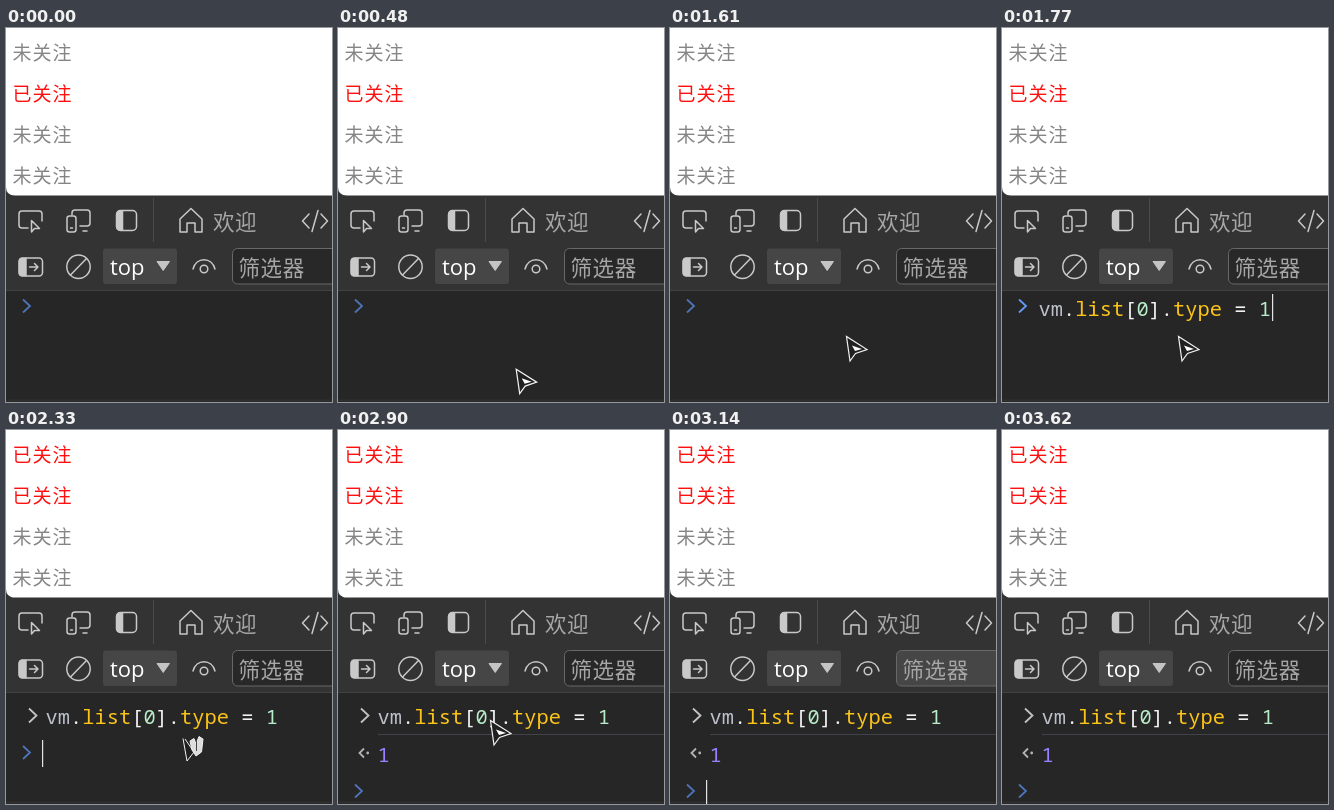
An HTML page that plays this animation: 326 px wide and 374 px high, repeating every 4.35 s.

```html
<!DOCTYPE html>
<html lang="zh">
<head>
<meta charset="utf-8">
<style>
html, body { margin: 0; width: 100%; height: 100%; overflow: hidden; background: #262626; }
svg { display: block; width: 326px; height: 374px; }
text { white-space: pre; }
.cjk { font-family: "Noto Sans CJK SC", "Noto Sans CJK", sans-serif; font-weight: 300; }
.row { font-size: 19px; letter-spacing: 1px; }
.ui { font-size: 21.5px; letter-spacing: .6px; fill: #a6a6a6; }
.code { font: 20.4px "Noto Sans Mono", "DejaVu Sans Mono", monospace; }
.icon { fill: none; stroke: #c9c9c9; stroke-width: 1.5; stroke-linecap: round; stroke-linejoin: round; }
.icon .solid { fill: #c9c9c9; }
.chev { fill: none; stroke-width: 1.8; }
</style>
</head>
<body>
<svg viewBox="0 0 326 374">
  <rect width="326" height="374" fill="#262626"/>
  <rect y="150" width="326" height="112" fill="#333"/>
  <path d="M0 262.5H326" stroke="#424242"/>
  <path d="M0 372.5H326" stroke="#2f2f2f" stroke-width="2"/>
  <path d="M0 0H326V167.5H9Q0 167.5 0 159Z" fill="#fff"/>
  <g id="rows" class="cjk row"></g>

  <path d="M147.5 170V214" stroke="#4b4b4b"/>
  <g class="icon">
    <path d="M22 200H16Q13 200 13 197V186Q13 183 16 183H33Q36 183 36 186V193"/>
    <path d="M25.5 192.500V204L28.500 200.500L33.500 200.500Z"/>
    <path d="M66 187V185Q66 182 69 182H81Q84 182 84 185V195Q84 198 81 198H74M77 203H81"/>
    <rect x="61" y="188" width="9" height="16" rx="2.500"/>
    <path d="M64.500 200H66.500"/>
    <rect x="110.500" y="182.500" width="20" height="20" rx="4"/>
    <path class="solid" d="M116.500 183H114Q111 183 111 186V199Q111 202 114 202H116.500Z"/>
    <path d="M174 191L185 180.500L196 191V204H189V195H181V204H174Z"/>
    <path d="M303 186L296.500 193L303 200M315 186L321.500 193L315 200M312 182.500L306 203.500"/>
    <rect x="13" y="230" width="23.500" height="18" rx="3.500"/>
    <path class="solid" d="M20 230.500H16Q13.500 230.500 13.500 233V245Q13.500 247.500 16 247.500H20Z"/>
    <path d="M23.500 239H32M28.500 235.500L32 239L28.500 242.500"/>
    <circle cx="72.500" cy="238.800" r="11.700"/>
    <path d="M64.500 247L80.500 230.500"/>
    <path d="M187 241C190 228.500 206 228.500 209 241"/>
    <circle cx="198" cy="241" r="3.800"/>
  </g>
  <text class="cjk ui" x="207" y="201.500">欢迎</text>
  <rect x="97" y="220.500" width="74" height="35.500" rx="3" fill="#464646"/>
  <text x="104" y="247" font-family="Open Sans, Noto Sans, sans-serif" font-size="22" fill="#fff">top</text>
  <path d="M151 233.500H163.500L157.200 242.500Z" fill="#c4c4c4" stroke="#c4c4c4" stroke-linejoin="round"/>
  <rect id="filter" x="226.500" y="220.500" width="110" height="35.500" rx="5" stroke="#686868"/>
  <text class="cjk ui" x="232.500" y="248">筛选器</text>

  <path id="rule" d="M40 304.500H326" stroke="#41434b"/>
  <text id="code" class="code"><tspan fill="#bcc0c8">vm</tspan><tspan fill="#f2f2f2">.</tspan><tspan fill="#fcc419">list</tspan><tspan fill="#f2f2f2">[</tspan><tspan fill="#b9ecc8">0</tspan><tspan fill="#f2f2f2">].</tspan><tspan fill="#fcc419">type</tspan><tspan fill="#f2f2f2"> = </tspan><tspan fill="#b9ecc8">1</tspan></text>
  <path id="past" class="chev" d="M23 278.500L30.500 285.500L23 292.500" stroke="#c4c4c4"/>
  <g id="result">
    <path class="chev" d="M26 318.500L21.500 323L26 327.500" stroke="#b4b4b4"/>
    <circle cx="29.700" cy="323" r="1.400" fill="#b4b4b4"/>
    <text class="code" x="39.500" y="332" fill="#9a80ff">1</text>
  </g>
  <path id="prompt" class="chev" d="M-3.500 -6.500L3.500 0L-3.500 6.500"/>
  <rect id="caret" width="1.200" height="27" fill="#e4e4e4"/>
  <g id="cursor">
    <path d="M.5 .5L4 25L9.500 17.500L21 13.500Z" fill="#202020" stroke="#f2f2f2" stroke-width="1.200"/>
    <path d="M6 9.500L16 13L9 15Z" fill="#fff"/>
  </g>
  <g id="blend" stroke="#f2f2f2" fill="#202020">
    <path d="M177 308.500L181 331L188 322L179 309"/>
    <path d="M184 311L188 308.500L190 314L193 306.500L197 309L195.500 322L190 326L186 320Z" fill="#ddd"/>
    <path d="M190.500 311V321" stroke="#444"/>
  </g>
</svg>
<script>
const LOOP = 4350, TICK = 80;
const TYPED = 1770, ENTERED = 2330, REPLIED = 2410;
const el = id => document.getElementById(id);
const attr = (id, values) => {
  for (const key in values) el(id).setAttribute(key, values[key]);
};
const show = (id, on) => attr(id, { visibility: on ? 'visible' : 'hidden' });
const move = (id, x, y) => attr(id, { transform: `translate(${x} ${y})` });
const within = (t, a, b) => t >= a && t < b;

const rows = [0, 1, 2, 3].map(i => {
  const row = document.createElementNS('http://www.w3.org/2000/svg', 'text');
  row.setAttribute('x', 6.5);
  row.setAttribute('y', 31.5 + i * 41);
  el('rows').append(row);
  return row;
});

// The pointer was sampled every 80 ms, so it moves in steps.
function pointer(t) {
  if (t < 2900) {
    const k = Math.min(1, Math.floor((t - 400) / TICK) / 4);
    const left = (1 - k) ** 2;
    return [176 + 3 * left, 308 + 58 * left];
  }
  const k = Math.floor((t - 2900) / TICK);
  return [152 + 52 * k, 290 - 25 * k];
}

function caretOn(t) {
  return within(t, 960, 1610) || within(t, TYPED, 2900) || within(t, 3140, 3620);
}

function draw(t) {
  const typed = t >= TYPED, entered = t >= ENTERED, replied = t >= REPLIED;

  rows.forEach((row, i) => {
    const on = i === 1 || (i === 0 && entered);
    row.textContent = on ? '已关注' : '未关注';
    row.setAttribute('fill', on ? '#ff1010' : '#858585');
  });

  show('code', typed);
  attr('code', { x: entered ? 39.5 : 36.5, y: entered ? 294 : 288 });
  show('past', entered);
  show('rule', replied);
  show('result', replied);

  const line = replied ? 361 : entered ? 322.5 : 278;
  move('prompt', 20.5, line);
  attr('prompt', { stroke: typed && !entered ? '#659af5' : '#4d74b8' });

  show('caret', caretOn(t));
  const caretY = replied ? 350 : entered ? 310 : 266;
  move('caret', typed && !entered ? 270 : 36, caretY);

  const blended = within(t, ENTERED, REPLIED);
  show('cursor', within(t, 400, 3060) && !blended);
  move('cursor', ...pointer(t));
  show('blend', blended);
  attr('filter', { fill: within(t, 3060, 3220) ? '#464646' : '#282828' });
}

const start = performance.now();
function frame() {
  draw((performance.now() - start) % LOOP);
  requestAnimationFrame(frame);
}
frame();
</script>
</body>
</html>
```
